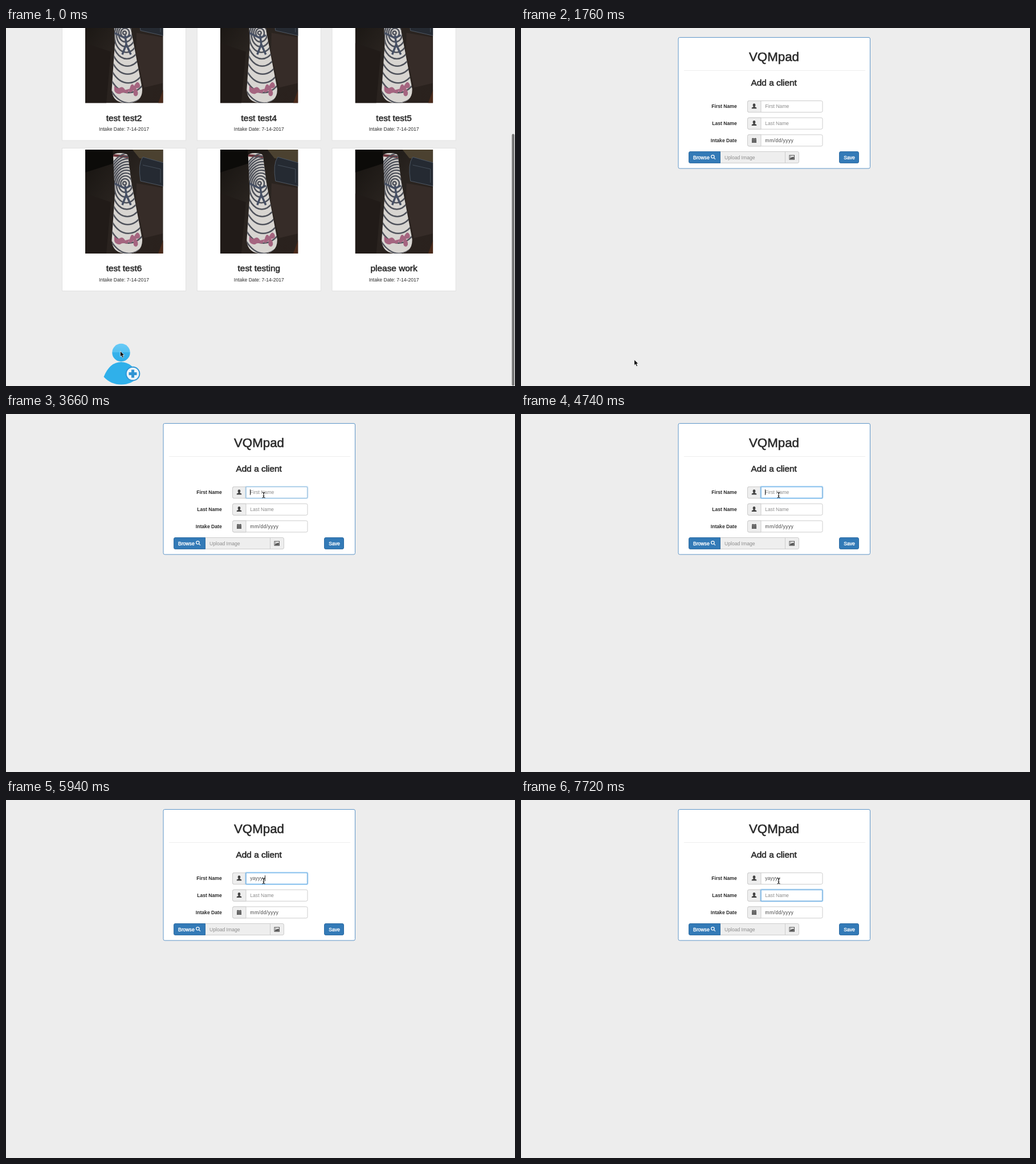
An HTML page for the animation above (8000 ms loop, 893 px wide and 627 px high).

```html
<!DOCTYPE html>
<html lang="en">
<head>
<meta charset="utf-8">
<title>Add a client</title>
<style>
  html, body { margin: 0; width: 100%; height: 100%; overflow: hidden; background: #ededed; }
  svg { display: block; font: 8.6px "Liberation Sans", Arial, sans-serif; fill: #2b2b2b; }
  .mid { text-anchor: middle; }
  .medium { stroke: #2b2b2b; stroke-width: .6px; }
  .title { font-size: 15.4px; }
  .label { font-weight: bold; text-anchor: end; }
  .hint { fill: #8c8c8c; }
  .box { stroke: #ccc; }
  .button { fill: #337ab7; stroke: #2e6da4; }
  .light { fill: #fff; stroke: #fff; stroke-width: .35px; }
  .icon { fill: #444; }
</style>
</head>
<body>
<svg width="893" height="627" viewBox="0 0 893 627">
  <defs>
    <linearGradient id="cloth" x2="1" y2="1">
      <stop stop-color="#15120f"/><stop offset=".45" stop-color="#2a2420"/><stop offset="1" stop-color="#2a211d"/>
    </linearGradient>
    <linearGradient id="skin" x2="0" y2="1">
      <stop stop-color="#68cbf7"/><stop offset=".5" stop-color="#55c0f0"/>
      <stop offset=".5" stop-color="#38b2eb"/><stop offset="1" stop-color="#2fafe9"/>
    </linearGradient>
    <clipPath id="frame"><rect x="139" y="213" width="136.5" height="182"/></clipPath>
    <clipPath id="board"><path id="outline" d="M188 224Q189 219 200 219Q213 219 214 224L220 270L239 370Q240 395 212 395Q187 395 185.500 372L191 290Z"/></clipPath>
    <g id="photo" clip-path="url(#frame)">
      <path fill="url(#cloth)" d="M139 213h137v182H139z"/>
      <path fill="#4b4130" d="M222 213h54v22l-42-7z"/>
      <path fill="#0c0b09" d="M139 213h48l2 24-50 16z"/>
      <path fill="#362c28" d="M229 272l46 8v80l-33 8-14-62z"/>
      <path fill="#211b18" d="M139 290l45 15-8 90h-37z"/>
      <path fill="#4a2a1b" d="M267 395l9-24v24z"/>
      <path fill="#252a32" stroke="#4d5763" d="M240 226l36 10v41l-40-9q-5-30 4-42z"/>
      <path fill="none" stroke="#454e59" d="M240 240l31 7v24"/>
      <use href="#outline" fill="#d8d5d1"/>
      <g clip-path="url(#board)">
        <path fill="#6b3239" d="M188 221l26 2v5l-26-3z"/>
        <g id="rings" fill="none" stroke="#50535c" stroke-width="2.600"></g>
        <path fill="none" stroke="#475064" stroke-width="3.500" d="M209 276l2 16-7 18m7-18l8 18M190 272l19 9 10-5"/>
        <path fill="#a56580" d="M190 364q5 7 10 4t9 4l8-2-4 8q-8-3-13 1-8 0-10-6zM217 370q3-13 8-5 5-11 9-4 4 8-6 8 7 11 0 14-6 0-4-11-5 7-9 3z"/>
      </g>
    </g>
    <g id="user" class="icon">
      <ellipse cx="409" cy="135" rx="2.300" ry="2.800"/>
      <path d="M407.800 136h2.400v2l3 1.500v1.700h-8.400v-1.700l3-1.500z"/>
    </g>
  </defs>

  <g id="list">
    <g id="cards"></g>
    <circle cx="202" cy="568.500" r="15.700" fill="url(#skin)"/>
    <path fill="#30b0ea" d="M171.500 611Q182 585 202 585T232.500 611Q220 624.500 202 624.500T171.500 611z"/>
    <circle cx="222.500" cy="605.500" r="11.800" fill="#eef4f8" stroke="#2f98d9" stroke-width="2"/>
    <path stroke="#3194d3" stroke-width="5" d="M215.500 605.500h14m-7-7v14"/>
    <rect x="887.500" y="185.500" width="4.500" height="441" rx="2.200" fill="#777"/>
  </g>

  <g id="form">
    <rect x="276" y="16.500" width="336.500" height="229.500" rx="2.500" fill="#fff" stroke="#5c94c7"/>
    <path stroke="#eee" d="M286 74.500h318"/>
    <text class="mid medium" x="444" y="58.300" font-size="22.300">VQMpad</text>
    <text class="mid medium title" x="443.700" y="100.500">Add a client</text>
    <g id="rows"></g>
    <use href="#user"/>
    <use href="#user" y="29.700"/>
    <path class="icon" d="M405 193.500h1.500v-1h1v1h3v-1h1v1h1.500v2h-8zM405 196h8v5h-8z"/>
    <path stroke="#aaa" stroke-width=".4" d="M405 197.700h8m-8 1.700h8m-6-3.400v5m2-5v5m2-5v5"/>
    <rect class="box" x="349.500" y="216.500" width="114" height="20" fill="#eee"/>
    <path class="box" fill="#eee" d="M463.500 216.500h21.500q2.500 0 2.500 2.500v15q0 2.500-2.500 2.500h-21.500z"/>
    <path class="button" d="M349.500 216.500h-52.500q-2.500 0-2.500 2.500v15q0 2.500 2.500 2.500h52.500z"/>
    <rect class="button" x="558.500" y="216.500" width="34" height="20" rx="2.500"/>
    <text class="light" x="302" y="229.600">Browse</text>
    <text class="light mid" x="576" y="229.600">Save</text>
    <text class="hint" x="357" y="229.600">Upload Image</text>
    <g fill="none" stroke="#fff" stroke-width="1.200"><circle cx="336.400" cy="225.300" r="2.700"/><path d="M338.400 227.300l2.600 2.600"/></g>
    <rect x="471" y="223" width="8.500" height="7.300" fill="#fff" stroke="#444"/>
    <path class="icon" d="M472 229.500v-1.500l2-2 1.200 1.200 2-2.500 1.500 2.300v2.500z"/><circle class="icon" cx="473.500" cy="225" r=".8"/>
    <rect id="caret" width="1" height="10"/>
  </g>

  <g id="pointer">
    <path id="arrow" stroke="#fff" stroke-width=".7" fill="#000" d="M0 0v9.700l2.200-2 1.700 3.800 1.900-.8-1.700-3.700h3z"/>
    <path id="beam" fill="none" stroke="#111" d="M-2.500-4.700q2.500 0 2.500 1.700 0-1.700 2.500-1.700M0-3.500v7M-2.500 4.700q2.500 0 2.500-1.700 0 1.700 2.500 1.700M-1.300 1.500h2.600"/>
  </g>
</svg>
<script>
const $ = id => document.getElementById(id);
const show = (id, on) => { $(id).style.display = on ? "" : "none"; };

// Value of the last [time, value] step that has been reached
const at = (steps, t) => steps.reduce((v, s) => t >= s[0] ? s[1] : v, steps[0][1]);

// Rings stay close together above the centre and spread out below it
$("rings").innerHTML = Array.from({ length: 11 }, (_, i) => {
  const drop = .35 * i * i;
  return `<ellipse cx="${208 + i * .8}" cy="${272 + drop}" rx="${3 + i * 4.5}" ry="${3 + i * 5 + drop}"/>`;
}).join("");

const names = ["test test2", "test test4", "test test5", "test test6", "test testing", "please work"];
$("cards").innerHTML = names.map((name, i) => `
  <g transform="translate(${i % 3 * 236.8} ${i < 3 ? -263.5 : 0})">
    <rect x="98.500" y="210.500" width="217" height="250" fill="#fff" stroke="#ddd" stroke-width=".8"/>
    <use href="#photo"/>
    <text class="mid medium title" x="207" y="426.300">${name}</text>
    <text class="mid" x="207" y="443.700">Intake Date: 7-14-2017</text>
  </g>`).join("");

const labels = ["First Name", "Last Name", "Intake Date"];
$("rows").innerHTML = labels.map((label, i) => `
  <g transform="translate(0 ${i * 29.7})">
    <text class="label" x="378.700" y="140.300">${label}</text>
    <rect class="box" x="397.500" y="127.500" width="131.500" height="20" rx="2.500" fill="#fff"/>
    <path class="box" fill="#eee" d="M421 127.500h-21q-2.500 0-2.500 2.500v15q0 2.500 2.500 2.500h21z"/>
    <g id="focus${i}" fill="none" stroke="#66afe9">
      <rect x="420.500" y="127" width="108.500" height="20.500" rx="1.500" stroke-width="3" opacity=".3"/>
      <rect x="421" y="127.500" width="108" height="20" rx="1"/>
    </g>
    <text id="value${i}" class="hint" x="428.300" y="140.300">${label}</text>
  </g>`).join("");
const first = $("value0"), date = $("value2");
date.textContent = "mm/dd/yyyy";
date.style.cssText = "fill:#444;letter-spacing:.42px";

const path = [
  [0, [200.5, 566]], [860, [200.3, 569]], [1010, [199.3, 576]], [1160, [198.7, 581]],
  [2050, [293.5, 425.5]], [2320, [398, 285]], [2470, [470, 205]], [2620, [506, 168]],
  [2760, [511, 151]], [2910, [487, 145]], [3060, [462, 143]], [3210, [452, 142]]
];
const focus = [
  [[0, 0], [3510, .25], [3660, .6], [3840, 1], [6230, .4], [6380, 0]],
  [[0, 0], [6230, .5], [6380, 1]],
  [[0, 0]]
];
const blink = [[0, 0], [3510, 1], [4140, 0], [4740, 1], [6830, 0], [7270, 1], [7720, 0]];

function draw(now) {
  const t = now % 8000, onForm = t >= 1760;
  show("list", !onForm);
  show("form", onForm);

  const [x, y] = at(path, t);
  const overInput = onForm && x > 421 && x < 529 && y > 127 && y < 207;
  $("pointer").setAttribute("transform", `translate(${x} ${y})`);
  show("arrow", !overInput);
  show("beam", overInput);

  focus.forEach((steps, i) => $("focus" + i).setAttribute("opacity", at(steps, t)));
  const typed = "yayyyy".slice(0, Math.max(0, Math.floor((t - 5190) / 150) + 1));
  first.textContent = typed || labels[0];
  first.style.fill = typed ? "#555" : "";

  const onSecond = t >= 6230;
  const width = typed && onForm && !onSecond ? first.getComputedTextLength() : 0;
  $("caret").setAttribute("x", Math.round(428 + width));
  $("caret").setAttribute("y", onSecond ? 162 : 132);
  show("caret", at(blink, t));
  requestAnimationFrame(draw);
}
requestAnimationFrame(draw);
</script>
</body>
</html>
```
